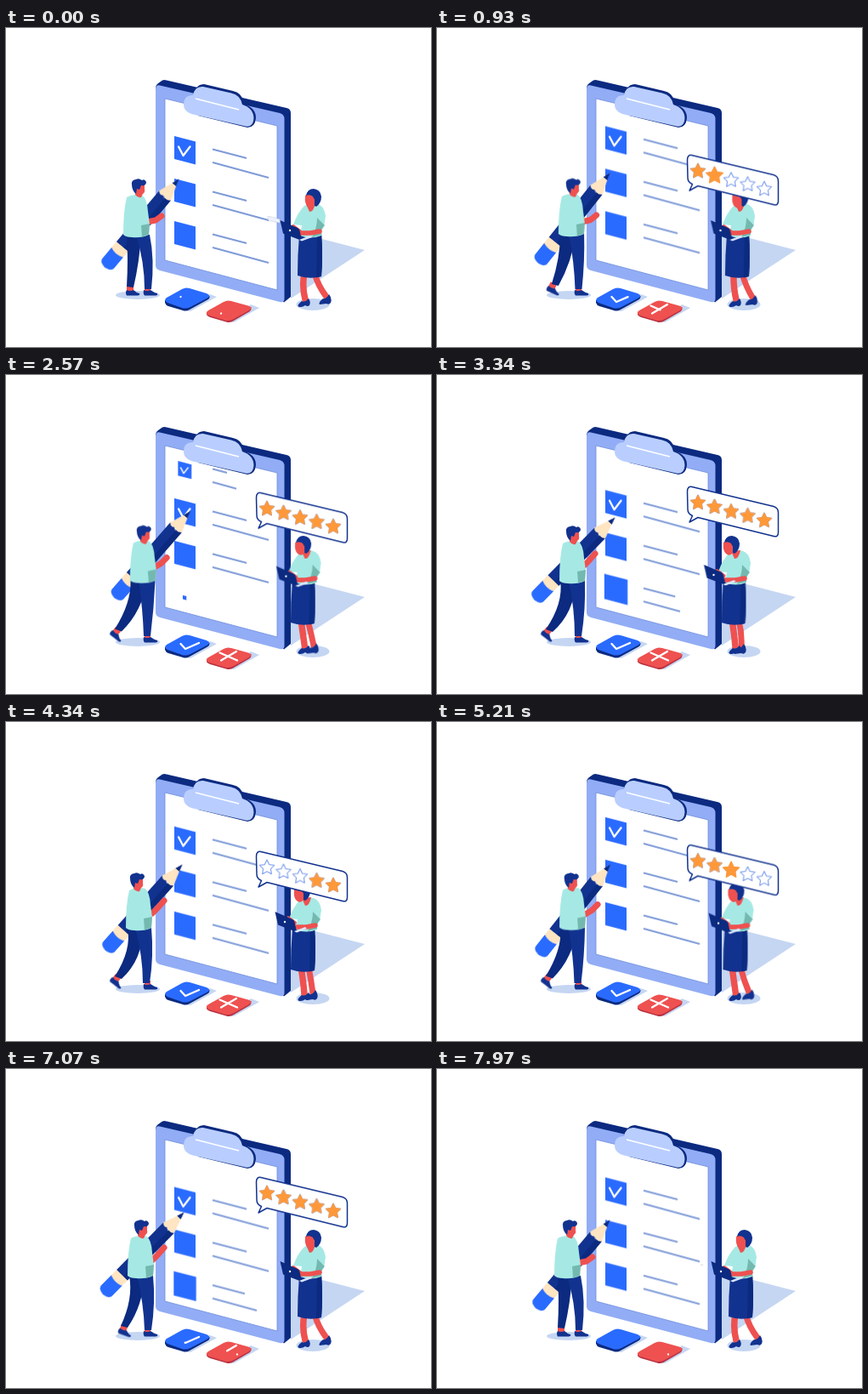
Animation of 500x375 px, one loop 8 s. Source, as an HTML page without scripts:

```html
<!DOCTYPE html>
<html lang="en">
<head>
<meta charset="utf-8">
<title>Checklist review</title>
<style>
html, body { margin: 0; width: 100%; height: 100%; overflow: hidden; background: #fff; }
svg { display: block; width: 100vw; height: 100vh; }

.navy { fill: #12328f; }
.deep { fill: #0b2a80; }
.blue { fill: #2a6bff; }
.red { fill: #ee5150; }
.teal { fill: #a6e9e4; }
.tealdark { fill: #74b9b0; }
.cream { fill: #ffe5c2; }
.shade { fill: #c5d6f2; }
.rule { fill: none; stroke: #7f9bd8; stroke-width: 2.1; }
.mark { fill: none; stroke: #fff; stroke-width: 2.3; stroke-linecap: round; stroke-linejoin: round; }
.skin { fill: none; stroke: #ee5150; stroke-linecap: round; stroke-linejoin: round; }
.draw { stroke-dasharray: 1 2; }

/* 4 s parts repeat twice in one loop */
.scroll, .tick, .leave, .enter, .pop, .star, .spark { animation: 4s linear infinite; }
.scroll { animation-name: scroll; }
.tick { animation-name: tick; }
.leave { animation-name: leave; transform-origin: 210px 144px; }
.leaveText { animation: leaveText 4s linear infinite; }
.enter { animation-name: enter; transform-origin: 210px 144px; }
.pop { animation-name: pop; transform-origin: 310px 225px; }
.spark { animation-name: spark; }
@keyframes scroll { to { transform: translateY(-50px); } }
@keyframes tick {
  0%, 37.4% { stroke-dashoffset: 1.1; }
  37.5% { stroke-dashoffset: 1; }
  46% { stroke-dashoffset: .72; }
  51.75% { stroke-dashoffset: .54; }
  60%, 100% { stroke-dashoffset: 0; }
}
@keyframes leave { 0%, 61% { transform: scale(1); } 70%, 100% { transform: scale(0); } }
@keyframes leaveText { 0%, 58% { stroke-dashoffset: 0; } 70%, 100% { stroke-dashoffset: 1.1; } }
@keyframes enter {
  0%, 62% { transform: scale(0); }
  76% { transform: scale(1.05); }
  83% { transform: scale(1.1); }
  93%, 100% { transform: scale(1); }
}
@keyframes pop {
  0% { transform: scale(.13); }
  7%, 87% { transform: scale(1); }
  94%, 99% { transform: scale(0); }
  100% { transform: scale(.13); }
}
@keyframes spark { 0%, 43% { opacity: 0; } 44.5%, 48% { opacity: 1; } 50%, 100% { opacity: 0; } }
.star { animation-name: star; transform: scale(0); }
@keyframes star { 0% { transform: scale(0); } 4% { transform: scale(1.18); } 7%, 80% { transform: scale(1); } 80.01%, 100% { transform: scale(0); } }

/* 8 s parts */
.line1 { animation: line1 8s linear infinite; }
.line2 { animation: line2 8s linear infinite; }
@keyframes line1 {
  0%, 34% { stroke-dashoffset: 1.1; }
  41.75% { stroke-dashoffset: .07; }
  43%, 50% { stroke-dashoffset: 0; }
  50.01%, 82% { stroke-dashoffset: 1.1; }
  88.4% { stroke-dashoffset: .05; }
  90%, 100% { stroke-dashoffset: 0; }
}
@keyframes line2 {
  0%, 36% { stroke-dashoffset: 1.1; }
  41.75% { stroke-dashoffset: .35; }
  45%, 50% { stroke-dashoffset: 0; }
  50.01%, 82% { stroke-dashoffset: 1.1; }
  88.4% { stroke-dashoffset: .21; }
  91%, 100% { stroke-dashoffset: 0; }
}
.yes { animation: yes 8s linear infinite; }
.no { animation: no 8s linear infinite; }
.no.b { animation-name: noB; }
@keyframes yes {
  0% { stroke-dashoffset: 1; } 13%, 84% { stroke-dashoffset: 0; }
  88.4% { stroke-dashoffset: -.3; } 99%, 100% { stroke-dashoffset: -1; }
}
@keyframes no {
  0% { stroke-dashoffset: 1; } 8%, 84% { stroke-dashoffset: 0; }
  88.4% { stroke-dashoffset: -.4; } 98%, 100% { stroke-dashoffset: -1; }
}
@keyframes noB {
  0%, 7% { stroke-dashoffset: 1.1; } 15%, 83% { stroke-dashoffset: 0; }
  88.4%, 100% { stroke-dashoffset: -1; }
}
.float { animation: float 8s linear infinite; }
@keyframes float {
  0%, 4% { transform: translateY(7px); }
  23% { transform: none; }
  41.75%, 47.5% { transform: translateY(-14px); }
  48%, 54.25% { transform: translateY(7px); }
  75.9% { transform: translateY(-8px); }
  88.4%, 97.5% { transform: translateY(-18px); }
  98%, 100% { transform: translateY(7px); }
}

.pencil { animation: pencil 8s ease-in-out infinite; }
@keyframes pencil {
  0%, 100% { transform: translate(203px, 178px) rotate(40deg); }
  18.5% { transform: translate(203px, 168px) rotate(38deg); }
  23% { transform: translate(208px, 175px) rotate(37deg); }
  25.9% { transform: translate(209px, 176px) rotate(37deg); }
  30% { transform: translate(217px, 160px) rotate(41deg); }
  41.75% { transform: translate(209px, 168px) rotate(44.4deg); }
  54.25% { transform: translate(207px, 168px) rotate(41.8deg); }
  68.5% { transform: translate(203px, 168px) rotate(38deg); }
  75.9% { transform: translate(210px, 175px) rotate(37deg); }
  80% { transform: translate(217px, 160px) rotate(41deg); }
  88.4% { transform: translate(209px, 169px) rotate(44.7deg); }
}
.mHead, .mBody, .mArm, .mBack, .mFront, .mFoot { animation: 8s ease-in-out infinite; }
.mHead { animation-name: mHead; }
.mBody { animation-name: mBody; }
.mArm { animation-name: mArm; }
.mBack { animation-name: mBack; }
.mFront { animation-name: mFront; }
.mFoot { animation-name: mFoot; }
@keyframes mHead {
  23% { transform: translate(7.5px, -1px); } 41.75% { transform: translate(4px, 0); }
  54.25% { transform: translate(-2px, 0); } 75.9% { transform: translate(5.5px, 0); }
  88.4% { transform: translate(3px, 0); }
}
@keyframes mBody {
  23% { transform: translate(9.5px, -2px); } 41.75% { transform: translate(6px, -1px); }
  54.25% { transform: translate(3px, -1px); } 75.9% { transform: translate(9px, -2px); }
  88.4% { transform: translate(5px, 0); }
}
@keyframes mArm {
  0%, 100% { d: path("M166 228 L176 226 L183 221"); }
  23%, 75.9% { d: path("M175 228 L185 225 L192 219"); }
  41.75%, 54.25%, 88.4% { d: path("M172 225 L179 218 L186 210"); }
}
@keyframes mBack {
  0%, 100% { d: path("M142 243 L159 243 Q157 275 150 305 L142 304 Q144 272 142 243Z"); }
  23%, 75.9% { d: path("M148 241 L168 241 Q160 275 136 301 L128 298 Q146 268 148 241Z"); }
  41.75% { d: path("M145 242 L163 242 Q162 279 136 302 L128 299 Q149 268 145 242Z"); }
  54.25% { d: path("M143 242 L161 242 Q161 279 136 302 L128 299 Q148 268 143 242Z"); }
  88.4% { d: path("M145 243 L163 243 Q161 278 143 304 L135 302 Q150 270 145 243Z"); }
}
@keyframes mFront {
  0%, 100% { d: path("M153 243 L169 243 Q175 272 171 307 L163 307 Q163 275 153 243Z"); }
  23%, 75.9% { d: path("M157 241 L177 241 Q173 275 170 307 L162 307 Q160 275 157 241Z"); }
  41.75% { d: path("M155 242 L174 242 Q175 275 170 307 L162 307 Q162 275 155 242Z"); }
  54.25% { d: path("M152 242 L171 242 Q174 275 169 307 L161 307 Q161 275 152 242Z"); }
  88.4% { d: path("M154 243 L173 243 Q176 275 171 307 L163 307 Q162 275 154 243Z"); }
}
@keyframes mFoot {
  0%, 100% { transform: translate(146px, 305px); }
  20%, 78% { transform: translate(131px, 300px) rotate(38deg); }
  88.4% { transform: translate(139px, 303px) rotate(20deg); }
}
.wHead, .wBody, .wSkirt, .wLap, .wLegA, .wLegB, .wFoot { animation: 8s ease-in-out infinite; }
.wHead { animation-name: wHead; }
.wBody { animation-name: wBody; }
.wSkirt { animation-name: wSkirt; }
.wLap { animation-name: wLap; }
.wLegA { animation-name: wLegA; }
.wLegB { animation-name: wLegB; }
.wFoot { animation-name: wFoot; }
@keyframes wHead {
  23% { transform: translateX(-9px); } 41.75% { transform: translateX(-15px); }
  54.25% { transform: translateX(-13px); } 75.9% { transform: translateX(-6px); } 88.4% { transform: none; }
}
@keyframes wBody {
  23% { transform: translateX(-4px); } 41.75% { transform: translateX(-7px); }
  54.25% { transform: translateX(-5px); } 75.9% { transform: translateX(-2px); } 88.4% { transform: none; }
}
@keyframes wSkirt {
  23% { transform: translateX(-8px); } 41.75% { transform: translateX(-8.5px); }
  54.25% { transform: translateX(-8px); } 75.9% { transform: translateX(-5px); } 88.4% { transform: none; }
}
@keyframes wLap {
  23% { transform: translate(-1px, 0); } 41.75% { transform: translate(-8.5px, -3px); }
  54.25% { transform: translate(-6px, -3px); } 75.9%, 88.4% { transform: none; }
}
@keyframes wLegA {
  0%, 88.4%, 100% { d: path("M351 288 Q348 304 352 319"); }
  23%, 75.9% { d: path("M347 288 Q349 306 352 320"); }
  41.75%, 54.25% { d: path("M347 288 Q350 306 351 320"); }
}
@keyframes wLegB {
  0%, 88.4%, 100% { d: path("M363 288 Q367 303 377 316"); }
  23% { d: path("M355 288 Q359 304 366 318"); }
  41.75% { d: path("M355 288 Q359 304 358 320"); }
  54.25% { d: path("M356 288 Q359 304 361 319"); }
  75.9% { d: path("M358 288 Q363 304 373 317"); }
}
@keyframes wFoot {
  23% { transform: translate(-11px, 2px); } 41.75% { transform: translate(-19px, 3px); }
  54.25% { transform: translate(-16px, 2px); } 75.9% { transform: translate(-3px, 1px); } 88.4% { transform: none; }
}
</style>
</head>
<body>
<svg viewBox="0 0 500 375" preserveAspectRatio="none">
<defs>
  <clipPath id="sheet"><path d="M187 83L319 115V308L187 273Z"/></clipPath>
  <path id="box" class="blue" d="M198 127L223 133.5V160.5L198 154Z"/>
  <path id="l1" pathLength="1" d="M243 142.5L283 153"/>
  <path id="l2" pathLength="1" d="M243 158L309 176"/>
  <path id="check" pathLength="1" d="M203 139.5L208.5 150L216.5 139.5"/>
  <path id="st" d="M0-9L2.7-3.4L8.7-2.6L4.4 1.6L5.3 7.6L0 4.8L-5.3 7.6L-4.4 1.6L-8.7-2.6L-2.7-3.4Z" stroke-linejoin="round"/>
  <g id="empty" fill="#fff" stroke="#8eaaf0" stroke-width="1.3"><use href="#st"/></g>
  <g id="full" fill="#ff9838" stroke="#ff9838" stroke-width="1"><use href="#st"/></g>
</defs>

<!-- ground -->
<path class="shade" d="M333 238L422 261L335 318Z"/>
<ellipse class="shade" cx="155" cy="314" rx="26" ry="5"/>
<ellipse class="shade" cx="361" cy="325" rx="19.5" ry="7"/>
<path class="shade" d="M205 331L240 313L248 316L217 333ZM262 345L288 325L298 329L268 346Z"/>

<!-- clipboard -->
<path class="deep" d="M176 71Q176 67 179 65L184 61.5Q186 60.500 189 61.5L330 94Q335 95 335 100V316L327 322.500L200 200Z"/>
<path fill="#92adf5" d="M176 72Q176 66.500 181 67.500L322 100Q327.500 101.500 327.500 107V318Q327.500 323.500 322 322L181 285Q176 283.500 176 279Z"/>
<path fill="#fff" stroke="#6c8cdc" stroke-width=".8" d="M187 83L319 115V308L187 273Z"/>

<g clip-path="url(#sheet)"><g class="scroll">
  <g>
    <g class="leave"><use href="#box"/><use href="#check" class="mark"/></g>
    <g class="rule draw leaveText"><use href="#l1"/><use href="#l2"/></g>
  </g>
  <g transform="translate(0 50)">
    <use href="#box"/><use href="#check" class="mark draw tick"/>
    <g class="rule"><use href="#l1"/><use href="#l2"/></g>
  </g>
  <g transform="translate(0 100)">
    <use href="#box"/>
    <g class="rule"><use href="#l1"/><use href="#l2"/></g>
  </g>
  <g transform="translate(0 150)">
    <g class="enter"><use href="#box"/></g>
    <use href="#l1" class="rule draw line1"/><use href="#l2" class="rule draw line2"/>
  </g>
</g></g>

<!-- clip -->
<path class="deep" d="M220 80L223 72Q226 66 233 66L267 74Q277 76 279 86L281 90Q294 94 294 106Q293 117 284 117L226 103Z"/>
<path fill="#b9ceff" d="M209 90Q209 79 220 79Q222 68 232 69L265 76.500Q276 79 278 90Q291 94 291.500 106Q291 117 282 115.500L222 102Q209 99 209 90Z"/>
<path d="M223 83L274 96" stroke="#fff" stroke-width="1.4"/>

<!-- buttons -->
<path class="deep" d="M187 320V323Q188 326 191 327L208 332Q212 333.500 216 331L237 319.500Q240 318 239.500 315Z"/>
<path class="blue" d="M189 317L207 307Q211 304.500 216 306L236 312Q242 314.500 237 317.500L217 328Q212 330.500 207 329L190 323Q185 320 189 317Z"/>
<path fill="#b83040" d="M236 334V337Q237 339 240 340L259 345.500Q264 347 268 344L287 333Q289 331 288.500 328Z"/>
<path class="red" d="M238 332L256 322Q260 319.500 265 321L285 326.500Q291 328.500 286 332L268 342Q263 345 257 343.500L239 338Q233 335.500 238 332Z"/>
<g class="mark">
  <path class="draw yes" pathLength="1" d="M205.500 316L211 322L227 315"/>
  <path class="draw no" pathLength="1" d="M253 335.500L271 325"/>
  <path class="draw no b" pathLength="1" d="M251.500 326.500L272 335.500"/>
</g>

<!-- man -->
<g class="pencil">
  <path class="cream" d="M0 0L9 25Q4 29 0 26Q-4 29-9 25Z"/>
  <path class="deep" d="M0-1L3 8H-3Z"/>
  <path class="navy" d="M-9 25Q-5 29-2 26Q2 30 9 25V105H-9Z"/>
  <path class="deep" d="M2 27Q6 28 9 25V105H2Z"/>
  <path class="cream" d="M-9 103H9V114H-9Z"/>
  <path class="blue" d="M-9 112Q0 116 9 112V129Q9 134 0 135Q-9 134-9 129Z"/>
</g>
<g class="mFoot">
  <path class="red" d="M-4-2H4V5H-4Z"/>
  <path class="navy" d="M-4 3Q0 5 4 3Q7 6 11 7Q12 9 9 9.500H-4Q-6 6-4 3Z"/>
</g>
<path class="red" d="M163 304H170V311H163Z"/>
<path class="navy" d="M162 308Q166 310 170 308Q174 311 178 312Q179 314 176 314.500H163Q161 312 162 308Z"/>
<path class="deep mBack" d="M142 243L159 243Q157 275 150 305L142 304Q144 272 142 243Z"/>
<path class="navy mFront" d="M153 243L169 243Q175 272 171 307L163 307Q163 275 153 243Z"/>
<path class="skin mArm" stroke-width="7" d="M166 228L176 226L183 221"/>
<g class="mBody">
  <path class="teal" d="M142 199Q149 195 160 196.500Q166 200 167 216L169 231L168 243Q160 247 148 246Q141 246 138 243Q138 215 142 199Z"/>
  <path class="tealdark" d="M159 232L169 230L168 243L160 245.500Z"/>
</g>
<g class="mHead">
  <path class="red" d="M153 189L162 188Q165 192 161 195L159 199Q155 200 152 196ZM156 183H163V192Q161 196 156 193Z"/>
  <path class="navy" d="M148 184Q147 179 153 178Q156 176 160 179Q163 177 165 181Q165 186 159 185L157 190L154 189L153 195Q148 191 148 184Z"/>
</g>

<!-- woman -->
<path class="skin wLegB" stroke-width="7" d="M363 288Q367 303 377 316"/>
<path class="skin wLegA" stroke-width="7.500" d="M351 288Q348 304 352 319"/>
<path class="navy wFoot" d="M373 318Q377 319 380 313Q384 318 382 323Q380 326 377 324L369 325Q367 323 373 318Z"/>
<path class="navy" d="M348 321Q352 323 356 318Q359 322 357 326Q355 328 352 326Q348 329 344 327.500Q342 326 348 321Z"/>
<g class="wSkirt">
  <path class="navy" d="M345 243L371 241Q373 268 371 292Q357 296 343 291Q343 266 345 243Z"/>
  <path class="deep" d="M366 242L371 241Q373 268 371 292L365 293.500Z"/>
</g>
<g class="wBody">
  <path class="teal" d="M351 209Q358 205 367 207Q374 209 376 221L374 234Q371 236 371 244Q358 249 346 244L348 232L338 231Q343 217 351 209Z"/>
  <path class="tealdark" d="M366 223L375 232Q370 236 371 243L360 246Q366 235 366 223Z"/>
  <path class="skin" stroke-width="5.500" d="M369 239L358 241L346 241"/>
  <path class="red" d="M353 207L364 206Q362 216 357 216Z"/>
</g>
<g class="wLap">
  <path class="skin" stroke-width="4" d="M338 233L346 239"/>
  <path class="deep" d="M322.500 226L343 235Q345 236 345.500 238L348 250L326 241.500Z"/>
  <path fill="#dce7ff" d="M345 249L358 244L360 246L348 250.500Z"/>
  <circle cx="334" cy="238" r="1.2" fill="#fff"/>
</g>
<g class="wHead">
  <path class="navy" d="M354 197Q354 189 362 189Q370 190 371 198Q371 206 365 210Q360 208 360 200Z"/>
  <path class="red" d="M352 197Q356 193 361 195L363 201L363 209Q359 214 355 210Q351 207 352 197Z"/>
  <path class="navy" d="M353 197Q354 190 362 190Q368 192 368 201Q364 205 361 198Q357 195 353 197Z"/>
</g>

<!-- rating -->
<g class="float"><g class="pop">
  <path fill="#fff" stroke="#12328f" stroke-width="1.500" stroke-linejoin="round" d="M294.500 151Q294.500 144.500 300 145.500L396 168.500Q401.500 170 401.500 176V199Q401.500 205 396 203.500L307 181.500L297 187L300.500 179.500Q295 177 295 172Z"/>
  <g transform="translate(307 164)"><use href="#empty"/><g class="star" style="animation-delay:.5s"><use href="#full"/></g></g>
  <g transform="translate(326.500 169)"><use href="#empty"/><g class="star" style="animation-delay:.75s"><use href="#full"/></g></g>
  <g transform="translate(346 174.500)"><use href="#empty"/><g class="star" style="animation-delay:1s"><use href="#full"/></g></g>
  <g transform="translate(365.500 179.500)"><use href="#empty"/><g class="star" style="animation-delay:1.25s"><use href="#full"/></g></g>
  <g transform="translate(385 185)"><use href="#empty"/><g class="star" style="animation-delay:1.5s"><use href="#full"/></g>
    <g class="spark" fill="#f2763a"><circle cx="10" cy="-8" r="1"/><circle cx="11" cy="5" r="1"/><circle cx="-9" cy="-8" r="1"/><circle cx="2" cy="11" r="1"/></g>
  </g>
</g></g>
</svg>
</body>
</html>
```
